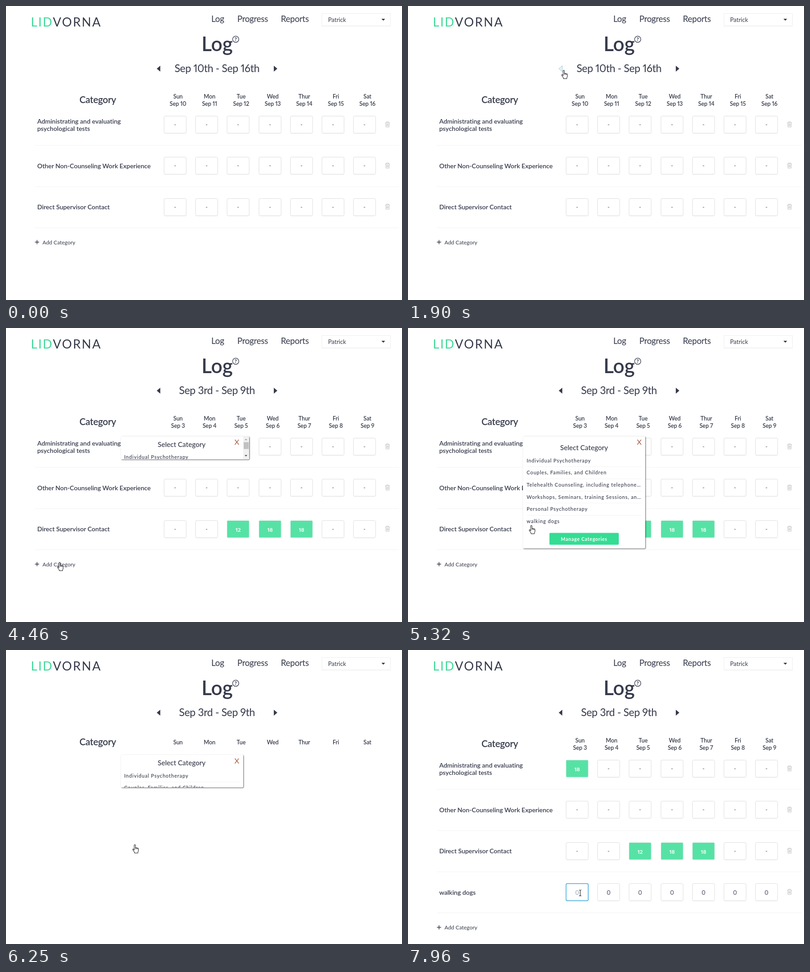
Animation of 868x645 px, one loop 8000 ms. Source, as an HTML page:

```html
<!DOCTYPE html>
<html lang="en">
<head>
<meta charset="utf-8">
<title>Weekly log</title>
<style>
html, body { margin: 0; width: 100%; height: 100%; overflow: hidden; background: #fff; }
svg { display: block; }
text { font-family: Lato, "Open Sans", sans-serif; font-variant-numeric: proportional-nums; }
.panel { filter: drop-shadow(1px 1px 1px rgba(0, 0, 0, .65)); }
.box { filter: drop-shadow(0 1px .5px rgba(0, 0, 0, .04)); }
</style>
</head>
<body>
<svg id="stage" width="868" height="645" viewBox="0 0 868 645"></svg>
<script>
const LOOP = 8000, INK = '#363a4b', GREEN = '#57e2a5', FADED = '#8fb3c4';
const stage = document.getElementById('stage');
const days = ['Sun', 'Mon', 'Tue', 'Wed', 'Thur', 'Fri', 'Sat'];
const labels = [['Administrating and evaluating', 'psychological tests'],
  ['Other Non-Counseling Work Experience'], ['Direct Supervisor Contact'], ['walking dogs']];
const hours = { '0,0': 18, '2,2': 12, '2,3': 18, '2,4': 18 };
const items = ['Individual Psychotherapy', 'Couples, Families, and Children',
  'Telehealth Counseling, including telephone…', 'Workshops, Seminars, training Sessions, an…',
  'Personal Psychotherapy', 'walking dogs'];

const text = (x, y, s, size, { w = 400, fill = INK, ls = 0, mid = false } = {}) =>
  `<text x="${x}" y="${y}" font-size="${size}" font-weight="${w}" fill="${fill}" letter-spacing="${ls}"` +
  `${mid ? ' text-anchor="middle"' : ''}>${s}</text>`;
const rect = (x, y, w, h, fill, more = '') =>
  `<rect x="${x}" y="${y}" width="${w}" height="${h}" fill="${fill}" ${more}/>`;
const path = (d, fill, more = '') => `<path d="${d}" fill="${fill}" ${more}/>`;

// Cursor legs: start, end, steps, target x, y, shape, optional bend point
const legs = [
  [370, 1150, 11, 365, 172, 'arrow', 530, 530],
  [1220, 1440, 4, 342, 141, 'hand'],
  [2850, 2850, 1, 327, 164, 'hand'],
  [2925, 3000, 2, 251, 302, 'arrow'],
  [3150, 3380, 4, 148, 499, 'arrow'],
  [3540, 3920, 6, 118, 514, 'hand'],
  [4696, 5010, 5, 270, 435, 'hand'],
  [5320, 5320, 1, 271, 433, 'hand'],
  [5397, 5630, 4, 283, 427, 'hand'],
  [6330, 6490, 3, 298, 415, 'arrow'],
  [6860, 7170, 5, 217, 507, 'arrow'],
  [7400, 7640, 4, 345, 530, 'arrow'],
  [7720, 7880, 3, 377.5, 533, 'beam']
];
const shapes = {
  arrow: path('M0 0V14L3.2 11L5.3 16L7.3 15.1L5.2 10.2H9.6Z', '#fff', 'stroke="#222"'),
  hand: path('M-2 12V1.6Q-2 0-.6 0T.8 1.6V7Q2 5.8 3 7.4Q4.4 6.3 5.2 8Q7 7.2 7.3 9V13Q7.2 15 6 16.5V18.5H-1.2V17L-5 11.5Q-5.6 9.5-4 9.6Z',
    '#fff', 'stroke="#23232b" stroke-width="1.1" stroke-linejoin="round"') +
    path('M.8 7V10M3 7.4V10M5.2 8V10.3', 'none', 'stroke="#23232b" stroke-width=".9"'),
  beam: path('M-2.5-6.5Q0-6.5 0-5V5Q0 6.5-2.5 6.5M2.5-6.5Q0-6.5 0-5M0 5Q0 6.5 2.5 6.5', 'none', 'stroke="#222" stroke-width="1.1"')
};

function cursor(t) {
  if (t < legs[0][0]) return '';
  let x = 668, y = 556, shape = 'arrow';
  for (const [t0, t1, n, tx, ty, kind, bx, by] of legs) {
    if (t < t0) break;
    const gap = n > 1 ? (t1 - t0) / (n - 1) : 1;
    const i = Math.min(n - 1, Math.floor((t - t0) / gap + 1e-6));
    const p = bx ? i / (n - 1) : (i + 1) / n, q = 1 - p;
    const cx = bx || (x + tx) / 2, cy = by || (y + ty) / 2;
    x = q * q * x + 2 * p * q * cx + p * p * tx;
    y = q * q * y + 2 * p * q * cy + p * p * ty;
    shape = kind;
  }
  return `<g transform="translate(${x.toFixed(1)} ${y.toFixed(1)})">${shapes[shape]}</g>`;
}

function header() {
  const nav = { ls: -.3 };
  return text(54.5, 45, '<tspan fill="#3fd998">LID</tspan>VORNA', 27, { ls: 2.3 }) +
    text(450, 35, 'Log', 18.6, nav) + text(507, 35, 'Progress', 18.5, nav) +
    text(602.5, 35, 'Reports', 18.6, nav) +
    rect(692.5, 16.5, 150, 27, '#fff', 'stroke="#eee" class="box"') +
    text(706, 34.5, 'Patrick', 13) + path('M823 28H831L827 32.3Z', INK) +
    text(428.5, 99, 'Log', 43.5, { w: 600 }) +
    `<circle cx="503.5" cy="73" r="6.8" fill="none" stroke="${INK}" stroke-width="1.3"/>` +
    text(503.5, 77.3, '?', 11.5, { w: 700, mid: true });
}

function weekBar(past, lit) {
  const look = lit === 2 ? ['#e6f4f8', 'stroke="#a5cbdc"'] : lit ? ['#d9efeb', 'stroke="#b9d6d6"'] : [INK, ''];
  return path('M330.5 137.5L338.2 131V144Z', ...look) + path('M587 131V144L594.7 137.5Z', INK) +
    text(462.5, 145.3, past ? 'Sep 3rd - Sep 9th' : 'Sep 10th - Sep 16th', 22.8, { ls: -.4, mid: true });
}

const trash = y => path(`M831 ${y - 4}H841.5M834 ${y - 4}V${y - 6}H838.5V${y - 4}M832.3 ${y - 4}L832.8 ${y + 5.5}H839.8L840.3 ${y - 4}` +
  `M834.6 ${y - 2}V${y + 3.5}M836.3 ${y - 2}V${y + 3.5}M838 ${y - 2}V${y + 3.5}`, 'none', 'stroke="#c4c4c4" stroke-width="1"');

function cell(r, c, past, focus) {
  const x = Math.round(346 + 69.2 * c) + .5, y = Math.round(241 + 90.3 * r) + .5;
  const v = past && hours[r + ',' + c], sx = x + 24.2, o = { w: 600, mid: true };
  if (v) return rect(x, y, 48.5, 37.5, GREEN, 'rx="2" stroke="#cfe9de"') +
    text(sx, y + 24, v, 11.8, { ...o, w: 700, fill: '#fff' });
  const edge = focus ? 'stroke="#3fa9dc" stroke-width="1.5"' : 'stroke="#dedede"';
  return rect(x, y, 48.5, 37.5, '#fff', `rx="2.5" class="box" ${edge}`) + (r === 3
    ? text(sx, y + 24, '0', 12.8, { ...o, fill: focus ? '#a5b0b8' : '#5d6072' })
    : text(sx, y + 23.5, '-', 13, { ...o, fill: '#747784' }));
}

function table(past, rows, loading, focus, linkFill) {
  const head = { w: 600, ls: -.1, mid: true };
  let s = text(201, loading ? 209 : 213, 'Category', 20.5, { w: 600, ls: -.3, mid: true });
  days.forEach((d, i) => {
    const x = 377 + 69.2 * i;
    s += text(x, loading ? 207 : 203.3, d, 12.5, head);
    if (!loading) s += text(x, 219, 'Sep ' + (i + (past ? 3 : 10)), 12.5, head);
  });
  if (loading) return s;
  for (let r = 0; r < rows; r++) {
    const mid = 260.3 + 90.3 * r, two = labels[r].length > 1;
    labels[r].forEach((l, i) => {
      s += text(68.5, mid + (two ? -2.2 + 16 * i : 5.3), l, 14, { w: 600, ls: -.03 });
    });
    for (let c = 0; c < 7; c++) s += cell(r, c, past, focus && r === 3 && c === 0);
    s += trash(mid - .3) + rect(63, Math.round(305.4 + 90.2 * r), 799, 1, '#f3f3f3');
  }
  const y = 518 + 90.5 * (rows - 3);
  return s + path(`M63.5 ${y}H72.5M68 ${y - 4.5}V${y + 4.5}`, 'none', `stroke="${linkFill}" stroke-width="1.5"`) +
    text(80, y + 4.5, 'Add Category', 11.9, { fill: linkFill });
}

// h: visible height; mode: 'open' (with scrollbar), 'full' or 'close'
function panel(top, h, mode, picked) {
  const up = mode === 'full' ? 0 : 7.5, dx = up ? -1 : 0, w = mode === 'open' ? 281 : 268;
  let s = text(134 + dx, 30.5 - up, 'Select Category', 15.1, { w: 500, mid: true }) +
    text(255 + dx, 18.5, 'X', 16, { fill: '#a8553f', mid: true });
  items.forEach((it, i) => {
    const y = 57.3 + 26.6 * i - up;
    s += text(8 + dx, y, it, 11, { w: 500, ls: .83, fill: picked && i === 5 ? FADED : INK });
    if (i < 5) s += rect(8 + dx, Math.round(y + 9), 252, 1, '#f4f4f4');
  });
  s += rect(58 + dx, 212 - up, 152, 26, '#34dd93', 'rx="2"') +
    text(134 + dx, 229 - up, 'Manage Categories', 10.5, { w: 700, ls: .7, fill: '#fff', mid: true });
  if (mode === 'open') {
    const thumb = Math.max(15, (h - 26) * h / 246);
    s += rect(268, 0, 13, h, '#f1f1f1') + rect(269, 13, 11, thumb, '#c1c1c1') +
      path('M271 8.5H277L274 5.5Z', '#a3a3a3') + path(`M271 ${h - 9.5}H277L274 ${h - 6.5}Z`, '#444');
  }
  return rect(252, top, w, h, '#fff', 'rx="2" class="panel"') +
    `<svg x="252" y="${top}" width="${w}" height="${h}" overflow="hidden">${s}</svg>`;
}

const swing = p => .5 - .5 * Math.cos(Math.PI * Math.min(1, Math.max(0, p)));
const FULL = 246;

function popup(t, loading) {
  if (t < 4460 || t >= 6400) return '';
  const top = loading ? 230 : 237.5;
  if (t < 4774) {
    const q = 4460 + Math.floor((t - 4460) / 78.5) * 78.5;
    return panel(top, FULL * swing((q - 4340) / 400), 'open');
  }
  if (t < 6010) return panel(top, FULL, 'full', t >= 5850);
  const q = 6010 + Math.floor((t - 6010) / 80) * 80;
  const h = FULL * (1 - swing((q - 5995) / 400));
  return h > 1 ? panel(top, h, 'close', true) : '';
}

let shown = '';
function render(t) {
  const past = t >= 2310;
  const loading = (past && t < 2470) || (t >= 6090 && t < 6490);
  const lit = t >= 1900 && t < 2925 ? 2 : t >= 1440 && t < 1900 ? 1 : 0;
  const link = t >= 4230 && t < 4460 ? FADED : INK;
  const s = header() + weekBar(past, lit) + table(past, t >= 6490 ? 4 : 3, loading, t >= 7960, link) +
    popup(t, loading) + cursor(t);
  if (s !== shown) stage.innerHTML = shown = s;
}

const start = performance.now();
function tick() {
  render((performance.now() - start) % LOOP);
  requestAnimationFrame(tick);
}
tick();
</script>
</body>
</html>
```
